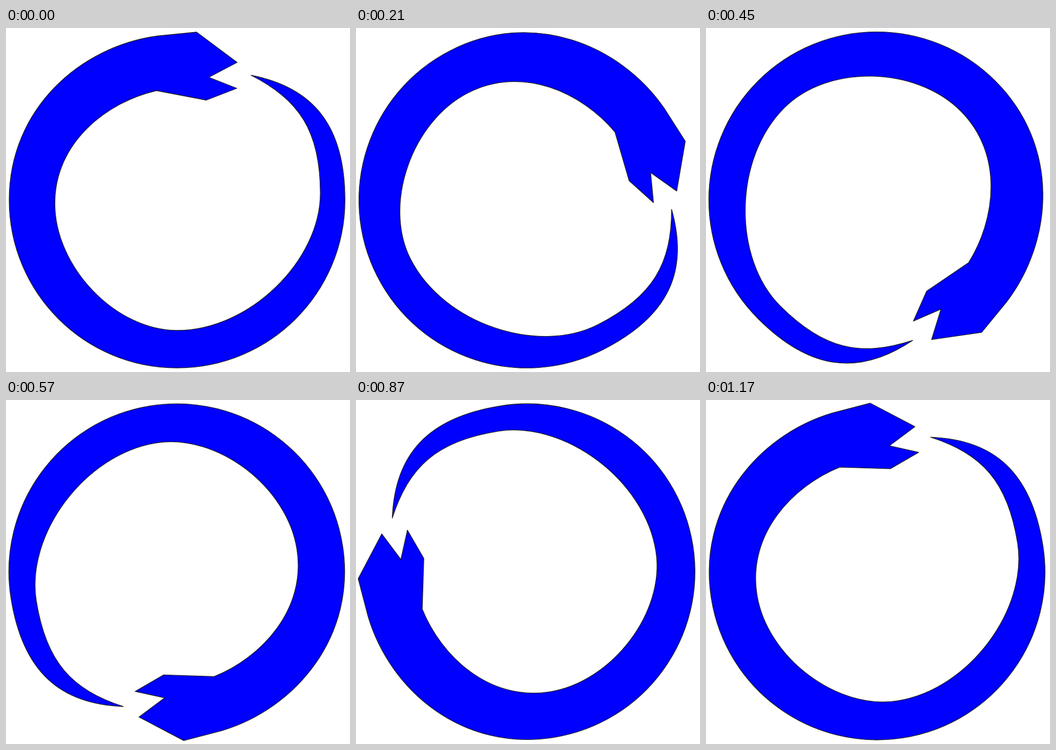
An HTML page with a canvas that plays this animation: 670 by 670 pixels, repeating every 1.2 s.

```html
<!DOCTYPE html>
<html lang="en">
<head>
<meta charset="utf-8">
<title>Ouroboros</title>
<style>
html, body { margin: 0; width: 100%; height: 100%; overflow: hidden; background: #fff; }
canvas { display: block; }
</style>
</head>
<body>
<canvas id="stage" width="670" height="670"></canvas>
<script>
const ctx = document.getElementById('stage').getContext('2d');
const SIZE = 670, STEPS = 40, STEP_MS = 30;
const PIVOT = { x: 332.9, y: 334.7 };
// the ring's own centre lies slightly off the pivot
const RING = { x: 333.2, y: 335 };

const snake = new Path2D(
  // outer edge, from the neck round to the tail
  'M295 15.5 C145 35.5 6 157 6 335 C6 515.6 152.4 662 333 662 ' +
  'C513.6 662 660 515.6 660 335 C660 190 598.5 116 477 92 ' +
  // inner edge, back to the neck
  'C570.5 139.8 612 200 612 322 C612 452 475 589 333 589 ' +
  'C213 589 95 465 95 342 C95 222 197 144 293 122 ' +
  // head
  'L390 140.5 L449.5 117.5 L395 96 L450 67 L371 8 Z'
);

function draw(now) {
  const step = Math.floor(now / STEP_MS) % STEPS;
  ctx.setTransform(1, 0, 0, 1, 0, 0);
  ctx.fillStyle = '#fff';
  ctx.fillRect(0, 0, SIZE, SIZE);

  ctx.translate(PIVOT.x, PIVOT.y);
  ctx.rotate(step / STEPS * 2 * Math.PI);
  ctx.translate(RING.x - PIVOT.x - 333, RING.y - PIVOT.y - 335);
  ctx.fillStyle = '#00f';
  ctx.strokeStyle = '#222';
  ctx.lineWidth = 1.3;
  ctx.lineJoin = 'round';
  ctx.fill(snake);
  ctx.stroke(snake);
}

let start;
function tick(now) {
  start ??= now;
  draw(now - start);
  requestAnimationFrame(tick);
}
draw(0);
requestAnimationFrame(tick);
</script>
</body>
</html>
```
